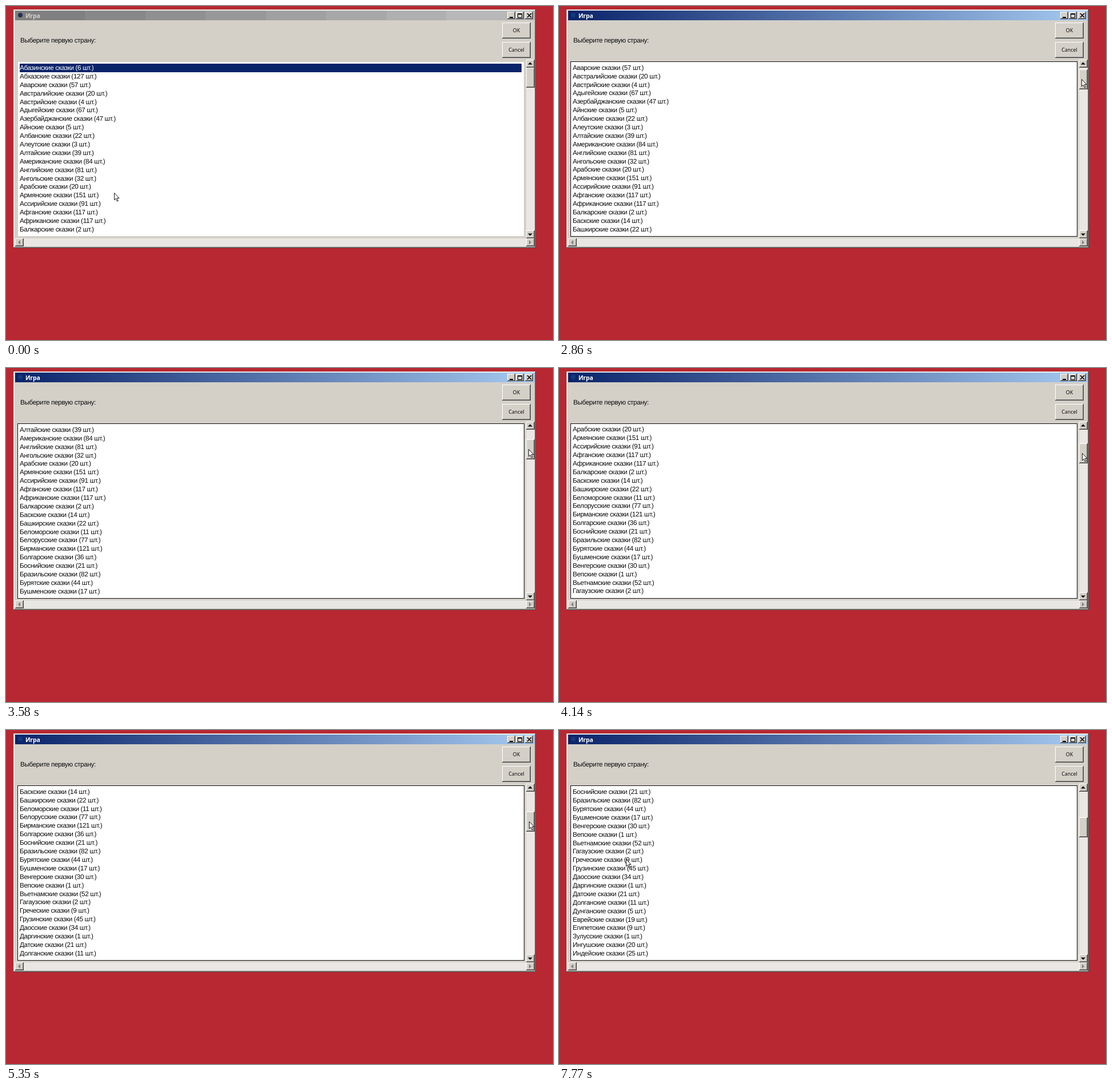
An HTML page for the animation above (8 s loop, 957 by 585 pixels).

```html
<!DOCTYPE html>
<html lang="ru">
<head>
<meta charset="utf-8">
<title>Игра</title>
<style>
html, body { margin: 0; width: 100%; height: 100%; overflow: hidden; background: #b82832; }
#stage { position: relative; width: 957px; height: 585px; overflow: hidden; color: #0c0c0c; }
#stage div, #stage ul, #stage svg { position: absolute; box-sizing: border-box; }
#win { left: 13px; top: 6px; width: 914px; height: 418px; background: #d4d0c8;
  box-shadow: inset -1px -1px #505050, inset 1px 1px #d4d0c8, inset -2px -2px #808080, inset 2px 2px #fff; }
#bar { left: 16px; top: 8px; width: 909px; height: 17px; }
.idle #bar { background: linear-gradient(90deg, #808080 122px, #888 0 228px, #909090 0 333px, #989898 0 439px,
  #a0a0a0 0 544px, #a8a8a8 0 650px, #b0b0b0 0 754px, #b8b8b8 0); }
.live #bar { background: linear-gradient(90deg, #0a246a, #a6caf0); }
#icon { left: 21px; top: 12px; width: 8px; height: 8px; border-radius: 50%; background: #20344e; }
.live #icon { background: #143a7c; }
.text { white-space: pre; font: 11.7px/15px "Liberation Sans", sans-serif; letter-spacing: -.36px; text-rendering: geometricPrecision; }
#name { left: 34px; top: 9px; font: bold 10.5px/16px "Noto Sans", sans-serif; letter-spacing: -.3px; color: #d4d0c8; }
.live #name { color: #fff; }
#ask { left: 25px; top: 53px; }
.raised { background: #d4d0c8; box-shadow: inset -1px -1px #404040, inset 1px 1px #fff, inset -2px -2px #808080; }
.push { left: 868px; width: 50px; height: 28px; text-align: center; font: 8.8px/28px "Noto Sans", sans-serif; }
#box { left: 20px; top: 97px; width: 887px; height: 307px; background: #fff; border: 1px solid #d4d0c8; }
.live #box { border-color: #101010; }
#view { left: 24px; top: 101px; width: 878px; height: 298px; overflow: hidden; }
#list { left: 0; top: 0; width: 100%; margin: 0; padding: 0; list-style: none; }
#list li { height: 14.9px; line-height: 15px; }
#list li:first-child { background: #0a246a; color: #fff; }
.track { background: #e9e7e3; }
#thumb { left: 910px; top: 0; width: 15px; height: 35px; }
#glyphs, #mouse { left: 0; top: 0; overflow: visible; }
</style>
</head>
<body>
<div id="stage" class="idle">
  <div id="win"></div>
  <div id="bar"></div>
  <div id="icon"></div>
  <div id="name">Игра</div>
  <div id="ask" class="text">Выберите первую страну:</div>
  <div class="raised push" style="top:29px">OK</div>
  <div class="raised push" style="top:63px">Cancel</div>
  <div id="box"></div>
  <div id="view"><ul id="list" class="text"></ul></div>
  <div class="track" style="left:910px;top:94px;width:15px;height:313px"></div>
  <div class="track" style="left:16px;top:407px;width:909px;height:14px"></div>
  <div id="thumb" class="raised"></div>
  <svg id="glyphs" width="957" height="585">
    <path d="M881 19h6v2h-6zM913 102.500h8l-4-4zM913 398.500h8l-4 4z"/>
    <path d="M895.5 13.5h7v7h-7zM895 14.5h8" fill="none" stroke="#000"/>
    <path d="M912 13l7 7M919 13l-7 7" stroke="#000" stroke-width="1.6"/>
    <path d="M25 410v8l-4-4zM915 410v8l4-4z" fill="#808080"/>
  </svg>
  <svg id="mouse" width="12" height="18">
    <path d="M.5 .5V12.800L3.300 10.200L5.300 15L7.300 14.200L5.300 9.500H9Z" fill="#fff" stroke="#000" stroke-width=".9"/>
  </svg>
</div>
<script>
const LOOP = 8000, GRAB = 2150, RELEASE = 6830;
const ROW = 14.9, PITCH = 1.725;
const $ = id => document.getElementById(id);
const stage = $('stage'), list = $('list'), thumb = $('thumb'), mouse = $('mouse');

const tales = `Абазин 6,Абхаз 127,Авар 57,Австралий 20,Австрий 4,Адыгей 67,Азербайджан 47,Айн 5,
Албан 22,Алеут 3,Алтай 39,Американ 84,Англий 81,Анголь 32,Араб 20,Армян 151,Ассирий 91,Афган 117,
Африкан 117,Балкар 2,Баск 14,Башкир 22,Беломор 11,Белорус 77,Бирман 121,Болгар 36,Босний 21,
Бразиль 82,Бурят 44,Бушмен 17,Венгер 30,Веп 1,Вьетнам 52,Гагауз 2,Грече 9,Грузин 45,Даос 34,
Даргин 1,Дат 21,Долган 11,Дунган 5,Еврей 19,Египет 9,Зулус 1,Ингуш 20,Индей 25`;
for (const tale of tales.split(',')) {
  const [root, count] = tale.trim().split(' ');
  const li = document.createElement('li');
  li.textContent = `${root}ские сказки (${count} шт.)`;
  list.append(li);
}

function raise(x, y, w, h) {
  const el = document.createElement('div');
  el.className = 'raised';
  el.style.cssText = `left:${x}px;top:${y}px;width:${w}px;height:${h}px`;
  stage.insertBefore(el, $('glyphs'));
}
for (const x of [877, 892, 908]) raise(x, 10, 14, 13);
for (const y of [94, 393]) raise(910, y, 15, 14);
for (const x of [16, 910]) raise(x, 407, 15, 14);

// [start, end, steps, row]
const drags = [
  [2700, 2700, 1, .6], [2860, 2860, 1, 2], [2947, 3210, 4, 7], [3350, 3580, 3, 10],
  [3840, 4370, 7, 17], [5170, 5350, 3, 20], [5500, 5500, 1, 22], [5650, 5650, 1, 23],
  [5800, 5920, 2, 26]
];
// [start, end, steps, x, y, bend of y]
const moves = [
  [500, 500, 1, 192, 322, 0], [750, 990, 5, 850, 104, 0], [1230, 1560, 6, 914, 125, 0],
  [RELEASE, 7340, 10, 117, 220, -160.5], [7660, 7770, 3, 117, 226, 0]
];

function progress(t, start, end, steps) {
  if (t < start) return 0;
  if (t >= end) return 1;
  return (Math.floor((t - start) / (end - start) * (steps - 1) + .001) + 1) / steps;
}

function rowAt(t) {
  let row = 0;
  for (const [start, end, steps, to] of drags) row += (to - row) * progress(t, start, end, steps);
  return row;
}

const held = row => [914 + row * .04, 125 + row * PITCH];

function pointerAt(t, row) {
  if (t >= GRAB && t < RELEASE) return held(row);
  let [x, y] = t < GRAB ? [189, 327] : held(row);
  for (const [start, end, steps, toX, toY, bend] of moves) {
    if (t >= GRAB && start < GRAB) continue;
    const k = progress(t, start, end, steps);
    x += (toX - x) * k;
    y += (toY - y) * k + 2 * bend * k * (1 - k);
  }
  return [x, y];
}

function draw(now) {
  const t = now % LOOP, row = rowAt(t);
  const [x, y] = pointerAt(t, row);
  stage.className = t < GRAB ? 'idle' : 'live';
  list.style.transform = `translateY(${-Math.floor(row + .001) * ROW}px)`;
  thumb.style.transform = `translateY(${Math.round(108 + row * PITCH)}px)`;
  mouse.style.transform = `translate(${Math.round(x)}px, ${Math.round(y)}px)`;
}

let begin;
function tick(now) {
  begin ??= now;
  draw(now - begin);
  requestAnimationFrame(tick);
}
draw(0);
requestAnimationFrame(tick);
</script>
</body>
</html>
```
